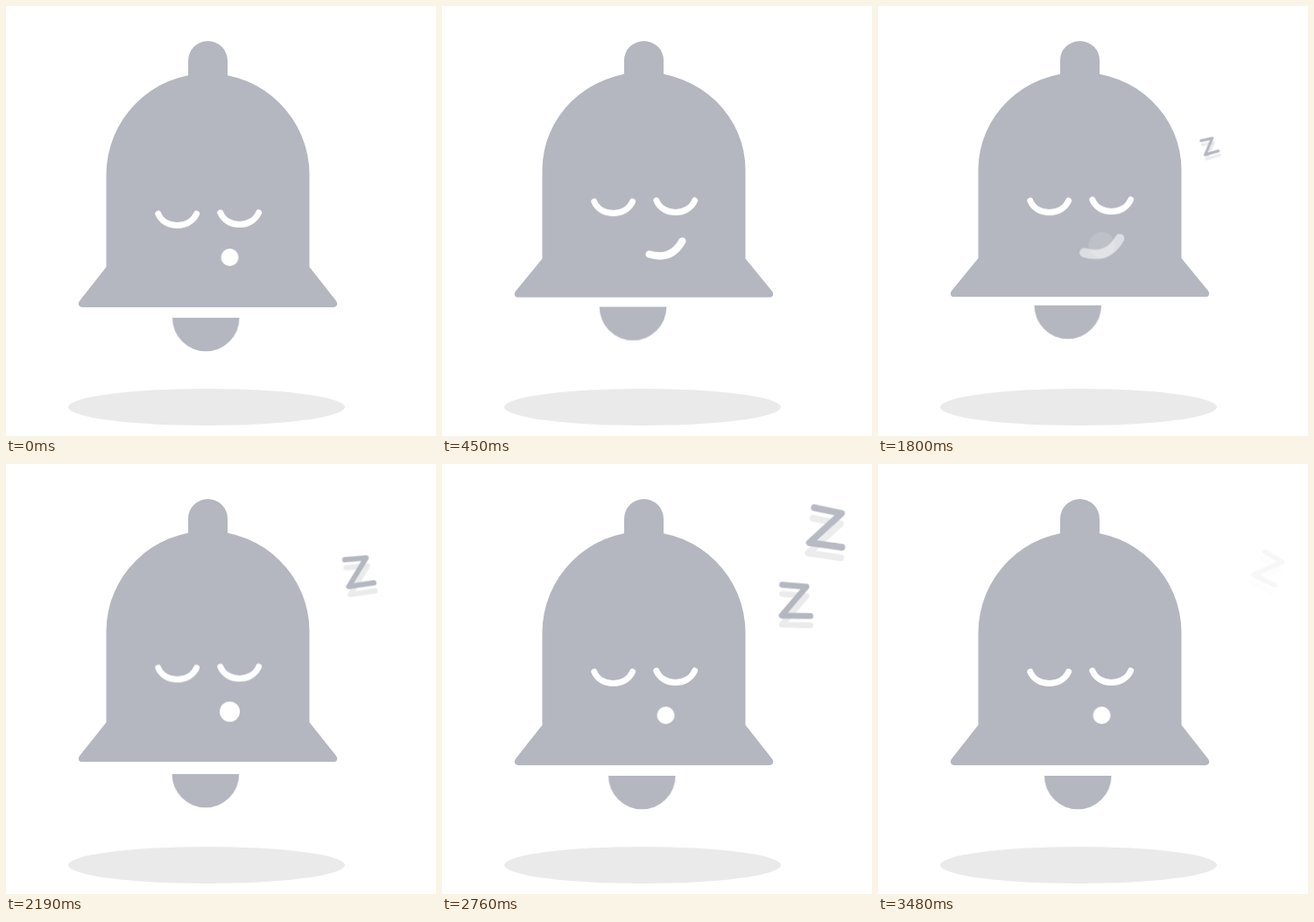
Recreate the animation shown at these times as an HTML page. Size 491 px wide and 491 px high, loop 3.63 s.

```html
<!DOCTYPE html>
<html lang="en">
<head>
<meta charset="utf-8">
<title>Sleeping bell</title>
<style>
  html, body { margin: 0; width: 100%; height: 100%; overflow: hidden; background: #fff; }
  svg { display: block; width: 100vw; height: 100vh; }

  .anim { animation: 3630ms linear infinite; transform-origin: 0 0; }
  .line { fill: none; stroke: #fff; stroke-linecap: round; stroke-linejoin: round; }
  .grey { fill: #b4b7c0; }

  /* Breathing: in over 60-640 ms, out over 1780-2780 ms */
  .body, .eyes, .hole { --ease: cubic-bezier(.37, 0, .63, 1); }
  .body { animation-name: body; transform-origin: 0 40px; }
  @keyframes body {
    0%, 1.653% { transform: scaleY(1); animation-timing-function: var(--ease); }
    17.631% { transform: scaleY(.9605); }
    49.036% { transform: scaleY(.9605); animation-timing-function: var(--ease); }
    76.584%, 100% { transform: scaleY(1); }
  }

  .eyes { animation-name: eyes; }
  @keyframes eyes {
    0%, 1.653% { transform: translateY(0); animation-timing-function: var(--ease); }
    17.631% { transform: translateY(-15px); }
    49.036% { transform: translateY(-15px); animation-timing-function: var(--ease); }
    76.584%, 100% { transform: translateY(0); }
  }

  .hole { animation-name: hole, hole-fade; }
  @keyframes hole {
    0%, 1.653% { transform: translate(255.5px, 287px) scale(1); animation-timing-function: var(--ease); }
    17.631% { transform: translate(255.5px, 273px) scale(1.5); }
    49.036% { transform: translate(255.5px, 273px) scale(1.5); animation-timing-function: var(--ease); }
    76.584%, 100% { transform: translate(255.5px, 287px) scale(1); }
  }
  @keyframes hole-fade {
    0%, 1.653% { opacity: 1; }
    5.51%, 48.9% { opacity: 0; }
    49.587% { opacity: .13; }
    51.8%, 100% { opacity: 1; }
  }

  .smile { animation-name: smile, smile-fade; }
  @keyframes smile {
    0%, 1.653% { transform: translate(255.5px, 287px) scale(.85); stroke-width: 8px; }
    12.397% { transform: translate(255.7px, 277px) scale(1); stroke-width: 8.5px; }
    20% { transform: translate(256px, 275px) scale(1.06); stroke-width: 9.2px; }
    27.273%, 49.587% { transform: translate(256px, 274.6px) scale(1.08); stroke-width: 9.8px; }
    53%, 100% { transform: translate(256px, 276px) scale(1.08); stroke-width: 9.8px; }
  }
  @keyframes smile-fade {
    0%, 2.204% { opacity: 0; }
    6.061%, 48.76% { opacity: 1; }
    49.587% { opacity: .56; }
    51.24%, 100% { opacity: 0; }
  }

  .clapper { --ease: cubic-bezier(.37, 0, .63, 1); animation-name: clapper; }
  @keyframes clapper {
    0%, 1.653% { transform: translate(228.2px, 356px); animation-timing-function: var(--ease); }
    20.386% { transform: translate(216.5px, 341.6px); }
    49.036% { transform: translate(216.5px, 341.6px); animation-timing-function: var(--ease); }
    68.871% { transform: translate(229.6px, 356px); animation-timing-function: var(--ease); }
    78.512%, 100% { transform: translate(228.2px, 356px); }
  }

  .z { fill: none; stroke-width: 8; stroke-linecap: round; stroke-linejoin: round; }
  .first { animation-name: first, first-fade; }
  @keyframes first {
    0%, 49.587% { transform: translate(378.5px, 160px) rotate(-18deg) scale(.4); }
    60.331% { transform: translate(403px, 123px) rotate(-10deg) scale(.74); }
    69.421% { transform: translate(424.5px, 93px) rotate(0deg) scale(1); }
    82.645% { transform: translate(456px, 53px) rotate(13deg) scale(.92); }
    85.124%, 100% { transform: translate(462px, 45.5px) rotate(15.5deg) scale(.88); }
  }
  @keyframes first-fade {
    0%, 49.3% { opacity: 0; }
    49.301%, 75.62% { opacity: 1; }
    82.645% { opacity: .26; }
    85.124%, 100% { opacity: 0; }
  }

  .second { animation-name: second, second-fade; }
  @keyframes second {
    0%, 61.157% { transform: translate(371px, 191px) rotate(-17deg) scale(.4); }
    69.421% { transform: translate(389.5px, 170.5px) rotate(-8deg) scale(.66); }
    81% { transform: translate(415px, 145.5px) rotate(5deg) scale(.97); }
    82.645% { transform: translate(418.5px, 142px) rotate(6.5deg) scale(.95); }
    95.868%, 100% { transform: translate(447px, 119.5px) rotate(25deg) scale(.69); }
  }
  @keyframes second-fade {
    0%, 60.9% { opacity: 0; }
    60.901%, 87.603% { opacity: 1; }
    95.868%, 99.999% { opacity: .12; }
    100% { opacity: 0; }
  }
</style>
</head>
<body>
<svg viewBox="0 0 491 491">
  <defs>
    <path id="zed" d="M-18.5-22 14.5-19-19.5 20 19.5 21"/>
    <g id="snore">
      <use href="#zed" y="12.5" stroke="#ebebec"/>
      <use href="#zed" stroke="#b4b7c0"/>
    </g>
  </defs>

  <ellipse cx="229" cy="458" rx="158" ry="21" fill="#eaeaea"/>

  <path class="anim clapper grey" d="M-38.3 0H38.3A38.3 38.3 0 0 1-38.3 0Z"/>

  <g class="anim body grey">
    <path d="M208 90V62.5a22.5 22.5 0 0 1 45 0V90Z"/>
    <path d="M114.5 193a116 116 0 0 1 232 0V298L376.8 336.5C379.5 340 378 344 374 344H87C83 344 81.500 340 84.200 336.500L114.500 298Z"/>
  </g>

  <g class="anim eyes line" stroke-width="7">
    <path d="M173.800 237.200C181 255 210 255 217.600 237.200"/>
    <path d="M244.800 236C252 254 281 254 288.600 236"/>
  </g>

  <circle class="anim hole" r="10" fill="#fff"/>
  <path class="anim smile line" d="M-19 6.500Q6 14 18.500-8.500"/>

  <g class="anim z first"><use href="#snore"/></g>
  <g class="anim z second"><use href="#snore"/></g>
</svg>
</body>
</html>
```
